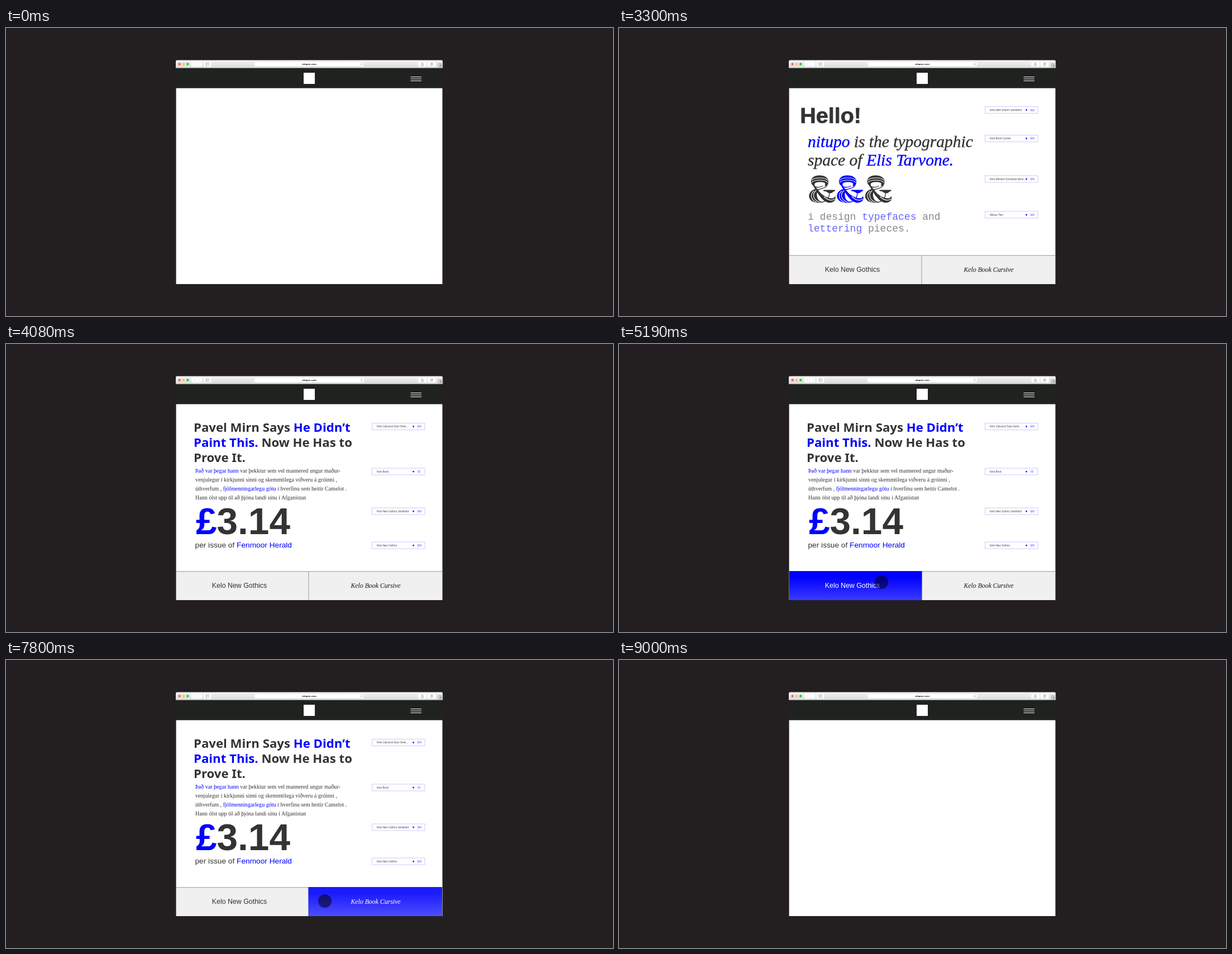
An HTML page that plays this animation: 1087x515 px, repeating every 9210 ms.

```html
<!DOCTYPE html>
<html lang="en">
<head>
<meta charset="utf-8">
<title>Type specimen site</title>
<style>
  html, body { margin: 0; width: 100%; height: 100%; overflow: hidden; background: #231f20; }
  svg { display: block; }
  text { font-family: "Liberation Sans", Arial, sans-serif; fill: #333; stroke: #333; stroke-width: 0; white-space: pre; }
  .b { fill: #00f; stroke: #00f; }
  .hello { font-size: 39.5px; font-weight: 700; stroke-width: .7; }
  .italic { font: italic 29.5px "Liberation Serif", Times, serif; stroke-width: .35; }
  .mono { font: 18px "Liberation Mono", Courier, monospace; fill: #888; }
  .mono .b { fill: #66f; }
  .head { font: 700 22.2px "Noto Sans", "Open Sans", sans-serif; }
  .para { font: 10.1px "Liberation Serif", Times, serif; }
  .price { font-size: 67.5px; font-weight: 700; }
  .issue { font-size: 13.7px; }
  .tag { font-size: 4.6px; fill: #444; }
  .lang { font-size: 5px; fill: #33f; }
  .btn { text-anchor: middle; font-size: 12.4px; }
  .btn.serif { font: italic 11.8px "Liberation Serif", Times, serif; stroke-width: .15; }
  .lit .btn { fill: #fff; stroke: #fff; }
  .url { font-size: 4.3px; font-weight: 700; text-anchor: middle; fill: #000; }
</style>
</head>
<body>
<svg width="1087" height="515" viewBox="0 0 1087 515">
  <defs>
    <linearGradient id="bar" x2="0" y2="1"><stop stop-color="#f3f3f3"/><stop offset="1" stop-color="#dadada"/></linearGradient>
    <linearGradient id="blue" x2="0" y2="1"><stop offset=".2" stop-color="#00f"/><stop offset="1" stop-color="#3a3aff"/></linearGradient>
    <clipPath id="page"><rect x="305" y="108" width="476" height="350"/></clipPath>
    <g id="amp">
      <path d="M4 13C3 4 10 0 19 0S36 4 35 13C34 17 31 19 28 19C31 14 29 12 20 12S9 14 11 19C7 18 5 16 4 13Z"/>
      <path d="M13 24C-5 28-4 49 17 49L25 48C13 46 12 31 18 25Z"/>
      <path d="M9 17C16 25 24 40 41 41C45 41 46 39 47 37C50 44 44 49 37 49C24 48 16 32 8 19Z"/>
      <path d="M26 26H47V28C43 28 43 32 38 32S33 28 26 28Z"/>
      <path d="M5 14C9 22 18 23 25 19M34 14C32 24 22 23 13 27M21 48C32 48 37 40 37 30" fill="none" stroke="currentColor" stroke-width="1.3"/>
      <path d="M5 9C9 3 30 3 34 9M5 13C9 7 30 7 34 13M9 28C1 34 4 45 14 48M13 27C5 34 8 44 19 48M27 38C34 45 42 46 47 42" fill="none" stroke="#fff" stroke-width="1.1"/>
    </g>
  </defs>

  <path d="M304 72V59.700q0-2.300 2.300-2.300H779.700q2.300 0 2.300 2.300V72Z" fill="url(#bar)"/>
  <circle cx="310.700" cy="64.500" r="2.200" fill="#fb615c"/>
  <circle cx="318" cy="64.500" r="2.200" fill="#fdc93e"/>
  <circle cx="325.300" cy="64.500" r="2.200" fill="#22c93f"/>
  <g fill="#fff">
    <rect x="332" y="60.500" width="9.300" height="8.300" rx="1"/>
    <rect x="342" y="60.500" width="9.300" height="8.300" rx="1"/>
    <rect x="354" y="60.500" width="13.500" height="8.300" rx="1"/>
    <rect x="445" y="61" width="196" height="7.500" rx="2.500"/>
    <rect x="738.500" y="60.500" width="14.500" height="8.300" rx="1"/>
    <rect x="755" y="60.500" width="14.500" height="8.300" rx="1"/>
  </g>
  <g fill="none" stroke="#888" stroke-width=".6">
    <path d="M337.500 63l-1.300 1.700 1.300 1.700M346 63l1.300 1.700-1.300 1.700" stroke="#bbb"/>
    <path d="M358 62.500h5.500v4.300H358ZM360 62.500v4.300M638.300 63.500a1.600 1.600 0 1 0 .3 1.600"/>
    <path d="M744.700 64h-1.200v3.300h4.300V64h-1.200M745.700 66v-4l-1.200 1.200M745.700 62l1.200 1.200"/>
    <path d="M760 63.800h3v3h-3ZM761.200 63.800v-1.300h3v3H763"/>
  </g>
  <rect x="774" y="63.500" width="8" height="7.500" fill="#ccc" stroke="#aaa" stroke-width=".6"/>
  <path d="M776.500 67.300h4M778.500 65.300v4" stroke="#777" stroke-width=".6"/>
  <text class="url" x="543" y="66.200">nitupoe.com</text>
  <rect x="304" y="71.600" width="478" height="36.400" fill="#20221f"/>
  <rect x="533" y="80" width="20" height="20" fill="#fff"/>
  <path d="M724.500 87.500h19.500M724.500 91h19.500M724.500 94.500h19.500" stroke="#fff"/>
  <rect x="304.600" y="107.600" width="476.900" height="350.300" fill="#fff"/>
  <g id="stage" clip-path="url(#page)"></g>
</svg>
<script>
const LOOP = 9210, STEP = 30;
const stage = document.getElementById('stage');

const blue = s => `<tspan class="b">${s}</tspan>`;
const text = (cls, x, y, s) => `<text class="${cls}" x="${x}" y="${y}">${s}</text>`;
const group = (id, body, cls = '') => `<g id="${id}" class="${cls}">${body}</g>`;
const amp = (x, color) => `<use href="#amp" x="${x}" y="263.500" fill="${color}" color="${color}"/>`;

function tag(y, name, lang, flip) {
  const turn = flip ? `transform="matrix(1 0 0 -1 0 ${2 * y + 13})"` : '';
  return `<g ${turn}><rect x="655.500" y="${y + .5}" width="94.500" height="12" fill="none" stroke="#ccccfb"/>
    ${text('tag', 664, y + 8.2, name)}${text('lang', 737, y + 8.3, lang)}
    <path d="M727.800 ${y + 5.5}h3.600l-1.800 3.200Z" fill="#00f"/></g>`;
}

const first = [
  text('hello', 336, 170, 'Hello!'),
  text('italic', 338, 213, blue('nitupo') + ' is the typographic') +
    text('italic', 338, 246, 'space of ' + blue('Elis Tarvone.')),
  amp(340, '#333') + amp(390, '#00f') + amp(440.5, '#333'),
  text('mono', 338, 343, `i design ${blue('typefaces')} and`) +
    text('mono', 338, 364, blue('lettering') + ' pieces.')
];
const second = [
  text('head', 336, 157, 'Pavel Mirn Says ' + blue('He Didn’t')) +
    text('head', 336, 184, blue('Paint This.') + ' Now He Has to') +
    text('head', 336, 211, 'Prove It.'),
  text('para', 339, 230, blue('Það var þegar hann') + ' var þekktur sem vel mannered ungur maður-') +
    text('para', 339, 246, 'venjulegur í kirkjunni sinni og skemmtilega viðveru á gróinni ,') +
    text('para', 339, 262, `úthverfum , ${blue('fjölmenningarlegu götu')} í hverfinu sem heitir Camelot .`) +
    text('para', 339, 278, 'Hann ólst upp til að þjóna landi sínu í Afganistan'),
  text('price', 340, 340, blue('£') + '3.14'),
  text('issue', 338.5, 364, 'per issue of ' + blue('Fenmoor Herald'))
];
const tagsA = tag(140, 'Kelo New Gothics Semibold', 'EN', true) + tag(191, 'Kelo Book Cursive', 'EN') +
  tag(263.5, 'Kelo Western Extrabold Inline', 'EN') + tag(327.5, 'Willum Thin', 'EN');
const tagsB = tag(141, 'Kelo Classical Sans Semi...', 'EN') + tag(221.5, 'Kelo Book', 'IS') +
  tag(292.5, 'Kelo New Gothics Semibold', 'EN') + tag(353.5, 'Kelo New Gothics', 'EN');

const leftLabel = text('btn', 418, 436, 'Kelo New Gothics');
const rightLabel = text('btn serif', 662, 436, 'Kelo Book Cursive');
const buttons = `<rect x="305" y="406" width="476" height="52" fill="#f0f0f0"/>
  <path d="M305 406.800H781M542 407V458" stroke="#999"/>` + leftLabel + rightLabel +
  group('left', '<rect x="305" y="406" width="237.500" height="52" fill="url(#blue)"/>' + leftLabel, 'lit') +
  group('right', '<rect x="541.500" y="406" width="239.500" height="52" fill="url(#blue)"/>' + rightLabel, 'lit');

stage.innerHTML = group('tagsA', tagsA) + group('tagsB', tagsB) +
  first.map((s, i) => group('a' + i, s)).join('') +
  second.map((s, i) => group('b' + i, s)).join('') +
  group('buttons', buttons) + '<circle id="cursor" r="12"/>';

const part = {};
stage.querySelectorAll('[id]').forEach(e => part[e.id] = e);

const ramp = (t, from, to) => Math.min(1, Math.max(0, (t - from) / (to - from)));
const ease = (t, from, to) => { const u = ramp(t, from, to); return u * u * (3 - 2 * u); };
const show = (id, alpha) => part[id].setAttribute('opacity', alpha);
const move = (id, x, y = 0) => part[id].setAttribute('transform', `translate(${x} ${y})`);
const SLIDE = 240;

function draw(t) {
  const intro = ramp(t, 0, 390);

  for (let i = 0; i < 4; i++) {
    const leaveA = 3273 + i * 115, enterB = 3520 + i * 107, leaveB = 8370 + i * 120;
    const outA = ease(t, leaveA, leaveA + SLIDE);
    move('a' + i, -335 * outA);
    show('a' + i, outA < 1 ? intro : 0);

    const inB = ease(t, enterB, enterB + SLIDE);
    const outB = ease(t, leaveB, leaveB + SLIDE);
    move('b' + i, 320 * (1 - inB) - 335 * outB);
    show('b' + i, outB < 1 ? Math.min(1, inB * 1.15) : 0);
  }

  const swap = ramp(t, 3810, 4050);
  show('tagsA', intro * (1 - swap));
  show('tagsB', swap * (1 - ramp(t, 8550, 8850)));
  show('buttons', intro * (1 - ramp(t, 8700, 9000)));

  // Pointer enters the left button, crosses to the right one, then leaves upward.
  const enter = ease(t, 4800, 5190), cross = ease(t, 6420, 6780), exit = ease(t, 7800, 8040);
  show('left', ramp(t, 4890, 5190) * (1 - ramp(t, 6420, 6780)));
  show('right', ramp(t, 6420, 6780) * (1 - ramp(t, 7770, 8040)));
  move('cursor', 500 - 30 * enter + 101 * cross, 355 + 71 * enter + 5 * cross - 79 * exit);
  show('cursor', .52 * ramp(t, 4800, 4950) * (1 - ramp(t, 7860, 8040)));
}

const start = performance.now();
function tick() {
  const t = (performance.now() - start) % LOOP;
  draw(Math.floor(t / STEP) * STEP);
  requestAnimationFrame(tick);
}
tick();
</script>
</body>
</html>
```
